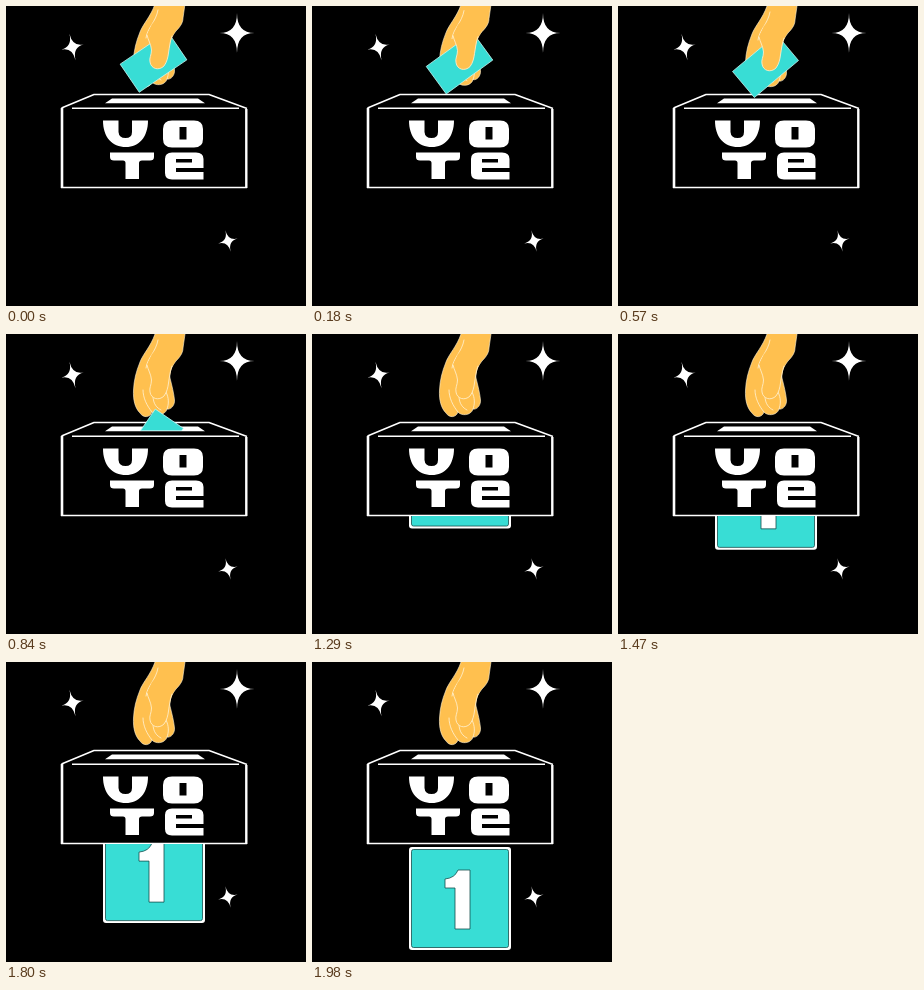
An HTML page for the animation above (2.32 s loop, 300 by 300 pixels).

```html
<!DOCTYPE html>
<html lang="en">
<head>
<meta charset="utf-8">
<title>Vote</title>
<style>
html, body { margin: 0; width: 100%; height: 100%; overflow: hidden; background: #000; }
svg { display: block; width: 100%; height: 100%; }
.skin { fill: #ffc04f; }
.teal { fill: #38ddd5; }
.crease { fill: none; stroke: #fff3d6; stroke-width: .8; stroke-linecap: round; }
</style>
</head>
<body>
<svg viewBox="0 0 300 300" role="img" aria-label="A hand drops a ballot into a box marked VOTE">
  <defs>
    <clipPath id="above"><rect width="300" height="96.5"/></clipPath>
    <clipPath id="below"><rect y="182" width="300" height="118"/></clipPath>
  </defs>
  <rect width="300" height="300"/>
  <g id="stars" fill="#fff"></g>

  <!-- box -->
  <g fill="none" stroke="#fff" stroke-linejoin="round">
    <path d="M55.5 102L88 88.500H203L241 102.500" stroke-width="1.5"/>
    <path d="M66 102.300H233" stroke-width="1.6"/>
    <path d="M56 102V182" stroke-width="2.6"/>
    <path d="M240.3 103V182" stroke-width="2.4"/>
    <path d="M55 181.500H241" stroke-width="1.6"/>
  </g>
  <path d="M106 92.500H192L199 97.200H99Z" fill="#fff"/>

  <!-- lettering -->
  <g fill="#fff" fill-rule="evenodd">
    <path d="M97 114.500H112.500V126Q113 132 119.500 132Q126 132 126 126V114.500H142C142 131 133 141 120 141C106 141 97 131 97 114.500Z"/>
    <path d="M166 114.500H188Q197 114.500 197 123V133Q197 141.500 188 141.500H166Q157 141.500 157 133V123Q157 114.500 166 114.500ZM173.500 121V133.500H180.500V121Z"/>
    <path d="M104 146.500H148V151Q148 154.500 144 154.500H136Q133 154.500 133 157V173H119.500V157Q119.500 154.500 117 154.500H108Q104 154.500 104 151Z"/>
    <path d="M166 146.500H190Q197.500 146.500 197.500 153V162H170V166H197.500V173.500H166Q159 173.500 159 167V153Q159 146.500 166 146.500ZM170 153V156.500H186V153Z"/>
  </g>

  <!-- hand holding the ballot -->
  <g id="hand">
    <path class="skin" d="M150 -10L149 0C145 12 137 20 134 28C130 38 128 46 127.500 56C127 66 129 74 134 79C137 84 144 84 146 78C149 82 159 82 161 75C165 76 169 71 168.500 66C168 60 166 52 164 44C163 38 166 32 170 27C175 22 177 18 177 14L179 0L180 -10Z"
      stroke="#fff3d6" stroke-width=".6"/>
    <path class="crease" d="M137 56C137 64 141 72 146 78M147 62C147 70 151 74 155 76M160 58C163 64 163 70 161 75M152 6C150 18 141 24 140 34"/>
  </g>
  <g clip-path="url(#above)">
    <rect id="card" class="teal" x="-17" y="-28.800" width="34" height="57.600" stroke="#c9f8f4" stroke-width=".7"/>
  </g>
  <g id="thumb">
    <path class="skin" d="M141 31C142 36 145 40 145.500 46C145.500 51 143 54 144 58C145 65 153 67 158 62C161 58 162 53 162.500 49C164 42 165 33 169 27.500L158 8L146 20Z"/>
    <path class="crease" d="M141 31C142 36 145 40 145.500 46C145.500 51 143 54 144 58C145 65 153 67 158 62C161 58 162 53 162.500 49C163.500 43 164 37 166 32"/>
  </g>

  <!-- ballot leaving the box -->
  <g clip-path="url(#below)">
    <g id="ballot">
      <rect x="97" y="185" width="102" height="103" rx="3" fill="#fff"/>
      <rect class="teal" x="99.5" y="187.500" width="97" height="98" rx="2" stroke="#164f4d" stroke-width=".8"/>
      <path d="M146 208H158V267H143V226H133V217Q143 216 146 208Z" fill="#fff" stroke="#164f4d" stroke-width=".8"/>
    </g>
  </g>
</svg>
<script>
const LOOP = 2320, STEP = 30;
const $ = id => document.getElementById(id);
const mix = (a, b, u) => a + (b - a) * u;
const clamp = u => Math.max(0, Math.min(1, u));

// four-pointed star with sides bending in towards its centre
function star(x, y, rx, ry, turn) {
  const path = document.createElementNS("http://www.w3.org/2000/svg", "path");
  path.setAttribute("d", `M0 ${-ry}Q0 0 ${rx} 0Q0 0 0 ${ry}Q0 0 ${-rx} 0Q0 0 0 ${-ry}Z`);
  path.setAttribute("transform", `translate(${x} ${y}) rotate(${turn})`);
  $("stars").append(path);
}
star(231, 27, 17.5, 20, 0);
star(66.5, 41, 11.5, 13.5, -13);
star(222, 235, 10, 11, -14);

function place(id, x, y, turn = 0) {
  $(id).setAttribute("transform", `translate(${x} ${y}) rotate(${turn})`);
}

function draw(time) {
  const t = Math.floor((time % LOOP) / STEP) * STEP;
  const reach = clamp(t / 570);
  const drop = clamp((t - 570) / 390);
  const rise = clamp((t - 1140) / 840);

  place("hand", 0, mix(-2, 0, reach));
  place("thumb", 0, mix(-2, 0, reach));

  // the ballot tips while it is lowered, then slides through the slot
  if (t < 570) place("card", 147.5, mix(56, 60, reach), mix(55.8, 50, reach));
  else place("card", mix(147.5, 146.8, drop), mix(60, 130, drop), mix(50, 27.5, drop));
  $("card").style.display = t < 960 ? "" : "none";

  place("ballot", 0, mix(-107, 0, Math.pow(rise, 1.2)));
}

const start = performance.now();
function tick() {
  draw(performance.now() - start);
  requestAnimationFrame(tick);
}
draw(0);
requestAnimationFrame(tick);
</script>
</body>
</html>
```
